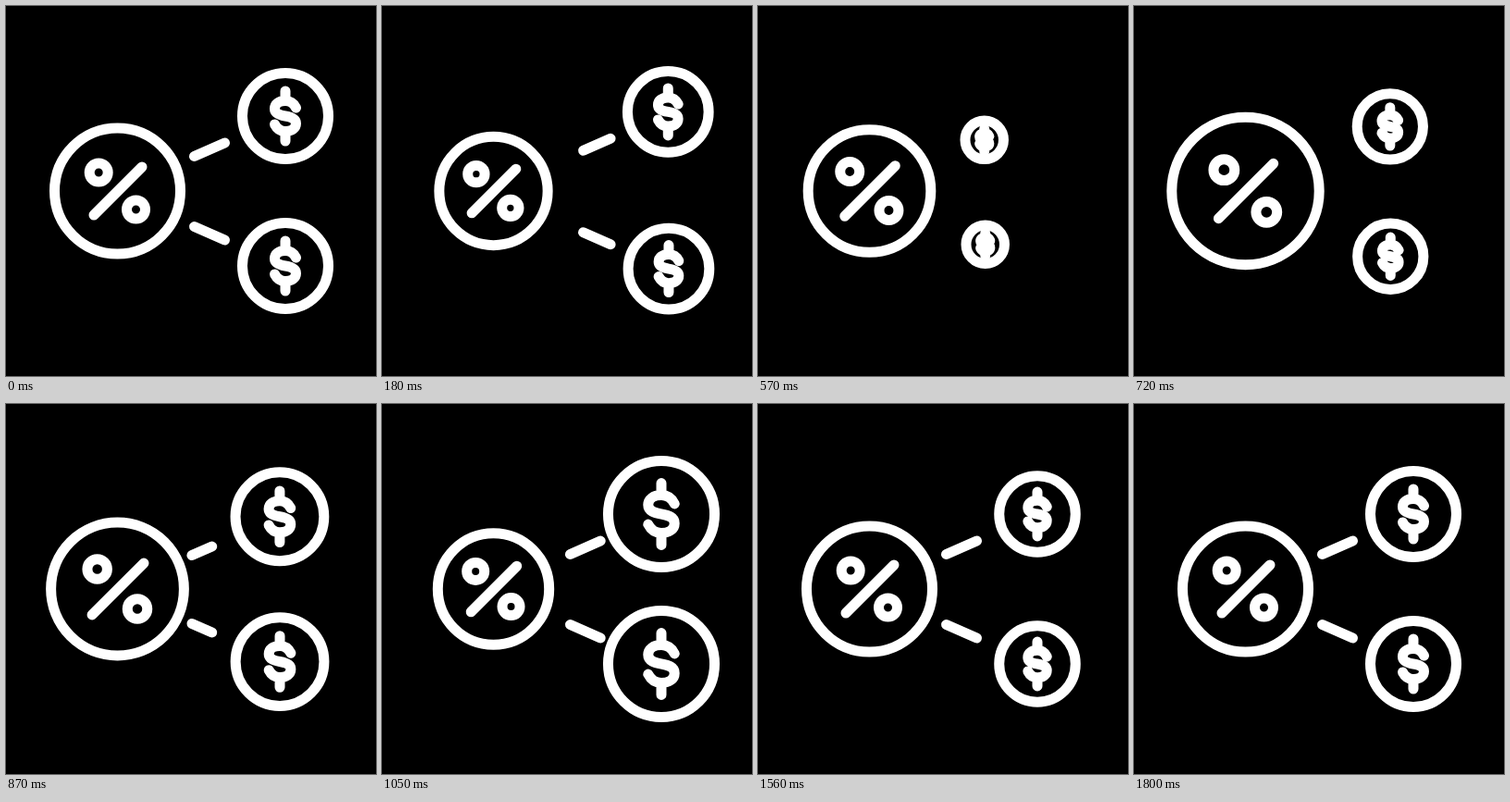
An HTML page for the animation above (1830 ms loop, 400 px wide and 400 px high).

```html
<!DOCTYPE html>
<html lang="en">
<head>
<meta charset="utf-8">
<title>Percent split</title>
<style>
  html, body { margin: 0; width: 100%; height: 100%; overflow: hidden; background: #000; }
  svg { display: block; }
  svg * {
    fill: none; stroke: #fff; stroke-width: 11;
    stroke-linecap: round; stroke-linejoin: round;
    vector-effect: non-scaling-stroke;
  }
</style>
</head>
<body>
<svg width="400" height="400">
  <defs>
    <g id="coinShape">
      <circle r="46.5"/>
      <path d="M0-27V-17M0 17V27M11.5-9C9-14 5-16.5 0-16.5C-7-16.5-11.5-13-11.5-8C-11.5-2.5-6-1 0 0S11.5 2.5 11.5 8C11.5 13 7 16.5 0 16.5C-5 16.5-9 14-11.5 9"/>
    </g>
  </defs>
  <path id="rayTop"/>
  <path id="rayLow"/>
  <circle id="ring" r="68"/>
  <g id="percent">
    <circle cx="-20.3" cy="-20" r="10"/>
    <circle cx="20" cy="20" r="10"/>
    <path d="M26.5-26L-25.5 26"/>
  </g>
  <use id="coinTop" href="#coinShape"/>
  <use id="coinLow" href="#coinShape"/>
</svg>
<script>
const LOOP = 1830, STEP = 30;
const SWAP = 375;   // outgoing parts vanish here
const ENTER = 390;  // new coins start here
const RAY_IN = 720;

// [time, scale], eased in and out between entries
const RING = [[0, 1], [410, .66], [690, 1.176], [1110, .87], [1560, 1]];
const PERCENT = [[0, 1], [330, .855], [720, 1.14], [1110, .94], [1560, 1]];
const COIN = [[1080, 1.25], [1440, .85], [1800, 1]];

const coins = [
  { el: 'coinTop', x: 302, y: 119, out: [128, -80], from: [-113, 51] },
  { el: 'coinLow', x: 302, y: 281, out: [140, 54], from: [-111, -46] }
];
const rays = [
  { el: 'rayTop', y: 155.2, slope: -.44 },
  { el: 'rayLow', y: 245.8, slope: .44 }
];

const get = id => document.getElementById(id);
const clamp = x => Math.min(1, Math.max(0, x));
const span = (t, start, length) => clamp((t - start) / length);

function track(keys, t) {
  for (let i = 1; i < keys.length; i++) {
    const [t0, a] = keys[i - 1], [t1, b] = keys[i];
    if (t < t1) return a + (b - a) * (1 - Math.cos(Math.PI * span(t, t0, t1 - t0))) / 2;
  }
  return keys[keys.length - 1][1];
}

function place(id, x, y, scale) {
  get(id).setAttribute('transform', `translate(${x} ${y}) scale(${scale})`);
}

function show(id, visible) {
  get(id).style.display = visible ? '' : 'none';
}

function drawCoin(c, t) {
  const leaving = t < SWAP;
  let scale, shift, amount;
  if (leaving) {
    amount = (t / 468) ** 3;
    scale = 1 - amount;
    shift = c.out;
  } else {
    amount = (1 - span(t, ENTER, 625)) ** 2;
    scale = t < 1080 ? 1.25 * (1 - (1 - span(t, ENTER, 690)) ** 1.46) : track(COIN, t);
    shift = c.from;
  }
  show(c.el, leaving || t > ENTER);
  place(c.el, c.x + shift[0] * amount, c.y + shift[1] * amount, scale);
}

function drawRay(r, t) {
  const leaving = t < SWAP;
  const gone = leaving ? (t / 381) ** 3 : (1 - span(t, RAY_IN, 360)) ** 2;
  const dx = gone * (leaving ? 117 : -24);
  const half = 16.5 * (1 - gone);
  const point = x => `${220 + x} ${r.y + x * r.slope}`;
  show(r.el, leaving || t > RAY_IN);
  get(r.el).setAttribute('d', `M${point(dx - half)}L${point(dx + half)}`);
}

function draw(t) {
  place('ring', 120.5, 200, track(RING, t));
  place('percent', 120.5, 200, track(PERCENT, t));
  coins.forEach(c => drawCoin(c, t));
  rays.forEach(r => drawRay(r, t));
}

const start = performance.now();
function tick() {
  const t = (performance.now() - start) % LOOP;
  draw(Math.floor(t / STEP) * STEP);
  requestAnimationFrame(tick);
}
tick();
</script>
</body>
</html>
```
